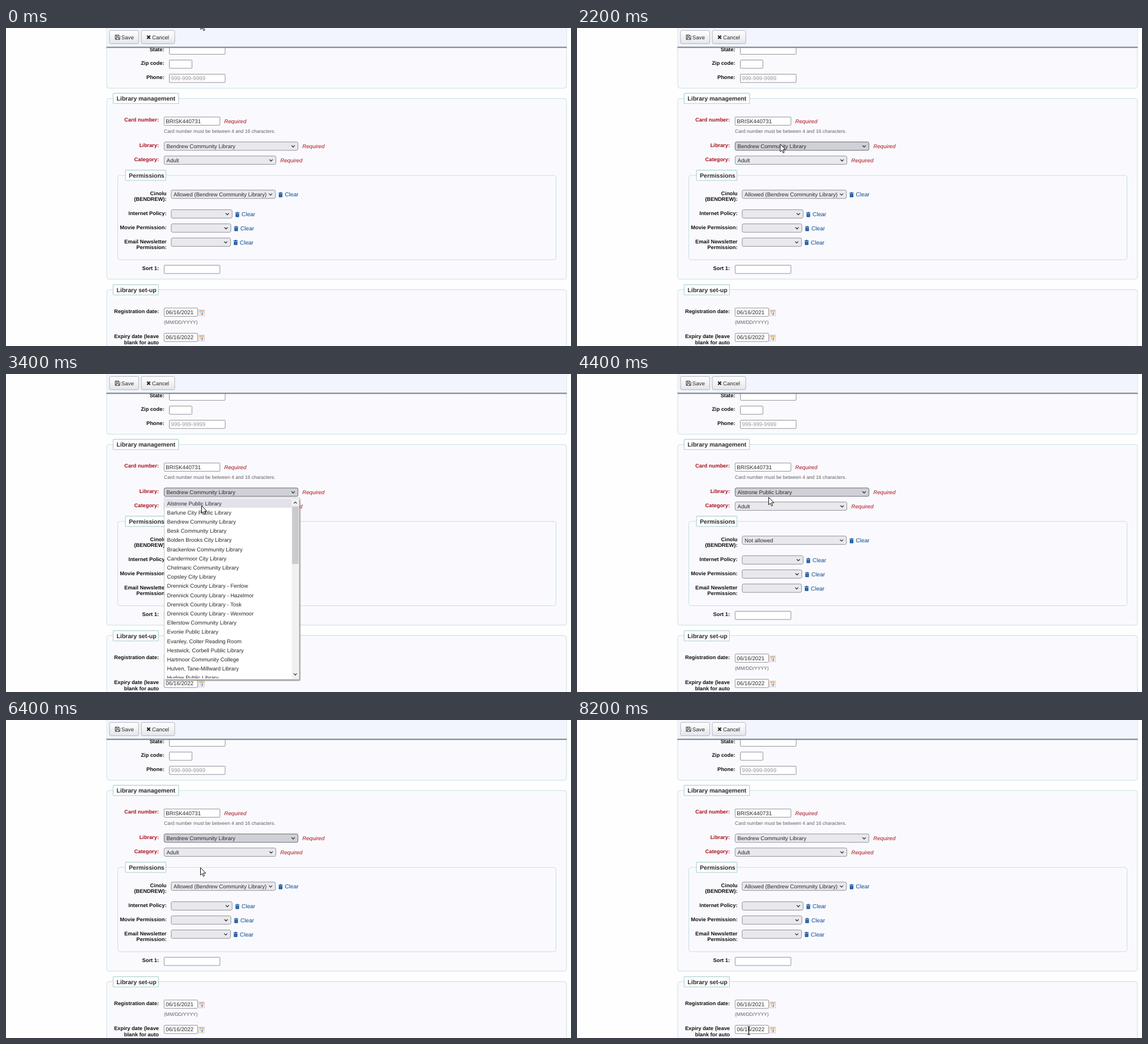
Write an HTML page that moves like this. It is 998 px wide and 561 px high and loops after 8400 ms.

```html
<!DOCTYPE html>
<html lang="en">
<head>
<meta charset="utf-8">
<title>Patron form</title>
<style>
html, body { margin: 0; width: 100%; height: 100%; overflow: hidden; background: #fefefe; }
svg { display: block; }
text { font: 9.65px "Liberation Sans", Arial, sans-serif; fill: #2a2a2e; text-rendering: geometricPrecision; }
.label { font-size: 9.3px; font-weight: bold; fill: #101010; text-anchor: end; }
.must { fill: #a8101c; }
.need { font-style: italic; fill: #a8101c; }
.legend { font-size: 10.55px; font-weight: bold; fill: #2c2c30; }
.hint { font-size: 8.53px; fill: #606064; }
.input { font-size: 9.75px; }
.ghost { fill: #97979b; }
.link { font-size: 10.1px; fill: #0a4a94; }
.group { fill: #fafafe; stroke: #c4dfe1; }
.tag { fill: #fff; stroke: #b9d8d9; stroke-width: 1.4; }
.field { fill: #fff; stroke: #8f8f9b; }
.icon { fill: #fff; stroke: #c9ccd2; }
.list { fill: #fff; stroke: #bcbcc2; stroke-width: .8; }
.button { fill: url(#shine); stroke: #b2b4ba; }
.line { fill: none; stroke: #303034; stroke-width: 1.25; }
</style>
</head>
<body>
<svg id="stage" width="998" height="561" viewBox="0 0 998 561"></svg>
<script>
const LOOP = 8400, STEP = 200, ROW = 16.2;
const libraries = [
  "Alstrone Public Library", "Barlune City Public Library", "Bendrew Community Library",
  "Besk Community Library", "Bolden Brooks City Library", "Brackenlow Community Library",
  "Candermoor City Library", "Chelmaric Community Library", "Copsley City Library",
  "Drennick County Library - Fenlow", "Drennick County Library - Hazelmor",
  "Drennick County Library - Tosk", "Drennick County Library - Wexmoor",
  "Ellerstow Community Library", "Evonie Public Library", "Evanley, Colter Reading Room",
  "Hestwick, Corbell Public Library", "Hartmoor Community College",
  "Hulven, Tane-Millward Library", "Hurlow Public Library"
];
const allowed = `Allowed (${libraries[2]})`;

// Pointer path: time, x, y
const path = [
  [0, 343.5, -11], [1200, 352, 208], [2200, 358.5, 204.5], [2600, 356, 208],
  [3400, 345, 232], [3800, 344, 229], [4400, 338, 217], [4800, 342, 208],
  [5400, 344, 205], [6000, 343, 258], [6400, 343, 260], [7000, 346, 292], [8200, 303.5, 548]
];

const inputs = [], selects = [];
const text = (x, y, s, cls = "", id = "") =>
  `<text x="${x}" y="${y}" class="${cls}"${id && ` id="${id}"`}>${s}</text>`;
const box = (x, y, w, h, cls, r = 0) =>
  `<rect x="${x}" y="${y}" width="${w}" height="${h}" rx="${r}" class="${cls}"/>`;
const fill = (x, y, w, h, color, id = "") =>
  `<rect x="${x}" y="${y}" width="${w}" height="${h}" fill="${color}"${id && ` id="${id}"`}/>`;
const line = d => `<path class="line" d="${d}"/>`;
const label = (x, y, s, must) => text(x, y, s, must ? "label must" : "label");
const need = (x, y) => text(x, y, "Required", "need");
const legend = (x, y, w, s) => box(x, y, w, 18.2, "tag", 1) + text(x + 6, y + 12.8, s, "legend");

function input(x, y, w, value = "", cls = "") {
  inputs.push({ x, y, w });
  return box(x, y, w, 14.6, "field", 1) + text(x + 3, y + 10.8, value, "input " + cls);
}

function select(id, x, y, w, value = "") {
  selects.push({ id, x, y, w });
  const cx = x + w - 8.5, cy = y + 6.2;
  return `<rect id="${id}" x="${x}" y="${y}" width="${w}" height="14.8" rx="2.5"/>`
    + text(x + 4.3, y + 11, value, "", id + "Text")
    + line(`M${cx - 2.8} ${cy}l2.8 2.8l2.8-2.8`);
}

function clear(x, y) {
  return `<g transform="translate(${x} ${y})" fill="#0a4a94">`
    + fill(0, 1, 7.4, 1.2, "#0a4a94") + fill(2.4, 0, 2.6, 1.2, "#0a4a94")
    + `<path d="M.6 2.9h6.2v5.2q0 .9-.9.9h-4.4q-.9 0-.9-.9z"/>`
    + `<path d="M2.4 4v3.8M3.7 4v3.8M5 4v3.8" stroke="#8aa9cc" stroke-width=".5"/></g>`
    + text(x + 11.2, y + 7.8, "Clear", "link");
}

function calendar(x, y) {
  return box(x, y, 10, 10.5, "icon") + fill(x + 1, y + 1, 8, 2.2, "#eaa557")
    + fill(x + 1.5, y + 4.4, 3, 2, "#a9c6e4") + fill(x + 5.2, y + 4.4, 3, 2, "#6f9dd0")
    + fill(x + 1.5, y + 7, 3, 2, "#dfe6ee") + fill(x + 4.6, y + 7, 2.8, 2, "#d9694f");
}

const form = [
  box(178, -10, 812, 116.2, "group", 4),
  label(279.5, 40.7, "State:"), input(288.5, 31.8, 98.6),
  label(279.5, 64.8, "Zip code:"), input(288.5, 56.5, 40),
  label(279.5, 89.7, "Phone:"), input(288.5, 81.5, 98.6, "999-999-9999", "ghost"),

  box(178, 124.5, 812, 318.5, "group", 4),
  legend(189.3, 115.2, 115.5, "Library management"),
  label(270, 165.2, "Card number:", true), input(279.3, 157, 98.6, "BRISK440731"), need(385.5, 167.5),
  text(279, 185, "Card number must be between 4 and 16 characters.", "hint"),
  label(270, 209.7, "Library:", true), select("library", 279.3, 201, 236.4, libraries[2]), need(523.5, 212),
  label(270, 234.7, "Category:", true), select("category", 279.3, 225.8, 197.4, "Adult"), need(484.5, 237),

  box(197.5, 260, 774, 148.8, "group", 4),
  legend(211, 250.7, 71.5, "Permissions"),
  label(283.5, 294.7, "Cinolu"), label(283.5, 305.2, "(BENDREW):"),
  select("stream", 291.8, 285.9, 184, allowed), clear(481.3, 289.6),
  label(283.5, 329.7, "Internet Policy:"), select("internet", 291.8, 320.6, 107.6), clear(404.9, 324.5),
  label(283.5, 354.7, "Movie Permission:"), select("movie", 291.8, 345.5, 105.4), clear(402.8, 349.3),
  label(283.5, 379.7, "Email Newsletter"), label(283.5, 390.2, "Permission:"),
  select("mail", 291.8, 370.4, 104.8), clear(401.9, 373.8),
  label(270, 427.2, "Sort 1:"), input(279.3, 418.5, 98.6),

  box(178, 461.5, 812, 140, "group", 4),
  legend(189.3, 452.7, 80, "Library set-up"),
  label(270, 502.7, "Registration date:"), input(279.3, 494, 59.2, "06/16/2021"), calendar(340.5, 497.3),
  text(279, 522.3, "(MM/DD/YYYY)", "hint"),
  label(270, 547.2, "Expiry date (leave"), label(270, 557.7, "blank for auto"),
  input(279.3, 538.5, 59.2, "06/16/2022"), calendar(340.5, 541.6),
  text(279, 566.8, "(MM/DD/YYYY)", "hint")
].join("");

const toolbar = [
  fill(177.5, 34, 813, 2.2, "url(#fade)"),
  fill(177.5, 0, 813, 33.2, "#f2f5fd"),
  fill(177.5, 0, .8, 33, "#dfe3ec"), fill(989.7, 0, .8, 33, "#dfe3ec"),
  fill(177.5, 33, 813, 1.2, "#73797d"),
  box(182.8, 4.3, 51.6, 23.4, "button", 2.5), box(239, 4.3, 59, 23.4, "button", 2.5),
  `<path d="M193 12.4h6.2l1.9 1.9v5.9h-8.1zM194.8 12.4v2.7h3.7v-2.7M194.5 20v-3h5v3" fill="none" stroke="#333" stroke-width=".95"/>`,
  text(203.8, 19.6, "Save"),
  `<path d="M249.2 13.6l5.4 5.4m0-5.4l-5.4 5.4" stroke="#222" stroke-width="2.1"/>`,
  text(258, 19.6, "Cancel")
].join("");

const menu = `<g id="menu">`
  + fill(281.5, 221, 237.8, 319.6, "#666", "shade")
  + box(279.4, 218, 238.6, 321, "list")
  + fill(281, 220, 223.5, 16, "#e3e2ea", "mark")
  + `<g clip-path="url(#window)">`
  + libraries.map((s, i) => text(284.6, 231.5 + ROW * i, s)).join("") + `</g>`
  + fill(504.8, 219, 12.6, 319, "#f0f0f0") + fill(505.3, 233.5, 11.6, 101.5, "#cbcbcd")
  + line("M508.4 228.4l2.6-2.6l2.6 2.6") + line("M508.4 528.4l2.6 2.6l2.6-2.6") + `</g>`;

const pointers =
  `<path id="arrow" d="M.5.5v13.2l3-2.8 2 4.8 2.1-.9-2-4.7h4.2z" fill="#fff" stroke="#111"/>`
  + `<path id="beam" d="M-2.6-7h2q.6 0 .6.7v12.6q0 .7-.6.7h-2M2.6-7h-2q-.6 0-.6.7v12.6q0 .7.6.7h2" fill="none" stroke="#111" stroke-width="1.1"/>`;

const $ = id => document.getElementById(id);
$("stage").innerHTML = `<defs>
  <linearGradient id="shine" x2="0" y2="1"><stop stop-color="#fff"/><stop offset="1" stop-color="#e5e6ea"/></linearGradient>
  <linearGradient id="fade" x2="0" y2="1"><stop stop-color="#8b9194"/><stop offset="1" stop-color="#8b9194" stop-opacity="0"/></linearGradient>
  <filter id="soft"><feGaussianBlur stdDeviation=".8"/></filter>
  <clipPath id="window"><rect x="281" y="219" width="223" height="318"/></clipPath>
</defs>` + form + toolbar + menu + pointers;
$("shade").setAttribute("filter", "url(#soft)");

const inside = (p, f) => p.x >= f.x && p.x <= f.x + f.w && p.y >= f.y && p.y <= f.y + 15;
const tones = [["#e9e9ed", "#8f8f9d"], ["#d0d0d7", "#676774"], ["#b1b1b9", "#484851"]];

function pointerAt(t) {
  const i = Math.max(1, path.findIndex(p => p[0] >= t));
  const [t0, x0, y0] = path[i - 1], [t1, x1, y1] = path[i];
  const k = (1 - Math.cos(Math.PI * (t - t0) / (t1 - t0))) / 2;
  return { x: x0 + (x1 - x0) * k, y: y0 + (y1 - y0) * k };
}

function draw(t) {
  const p = pointerAt(t);
  const open = t >= 2600 && t < 3800 || t >= 5000 && t < 6200;
  const choice = t >= 3800 && t < 6200 ? 0 : 2;

  for (const s of selects) {
    const over = inside(p, s);
    let tone = over && !open ? 1 : 0;
    if (s.id === "library") {
      if (t >= 2600 && t < 6600) tone = 1;
      if (open && over) tone = 2;
    }
    $(s.id).setAttribute("fill", tones[tone][0]);
    $(s.id).setAttribute("stroke", tones[tone][1]);
  }
  $("libraryText").textContent = libraries[choice];
  $("streamText").textContent = choice ? allowed : "Not allowed";

  const row = p.y >= 219 ? Math.max(0, Math.floor((p.y - 220) / ROW)) : choice;
  $("mark").setAttribute("y", 220 + ROW * row);
  $("menu").style.display = open ? "" : "none";

  const typing = !open && p.y > 35 && inputs.some(f => inside(p, f));
  $("arrow").style.display = typing ? "none" : "";
  $("beam").style.display = typing ? "" : "none";
  $(typing ? "beam" : "arrow").setAttribute("transform", `translate(${p.x} ${p.y})`);
}

const start = performance.now();
function tick() {
  const t = (performance.now() - start) % LOOP;
  draw(Math.floor(t / STEP) * STEP);
  requestAnimationFrame(tick);
}
tick();
</script>
</body>
</html>
```
